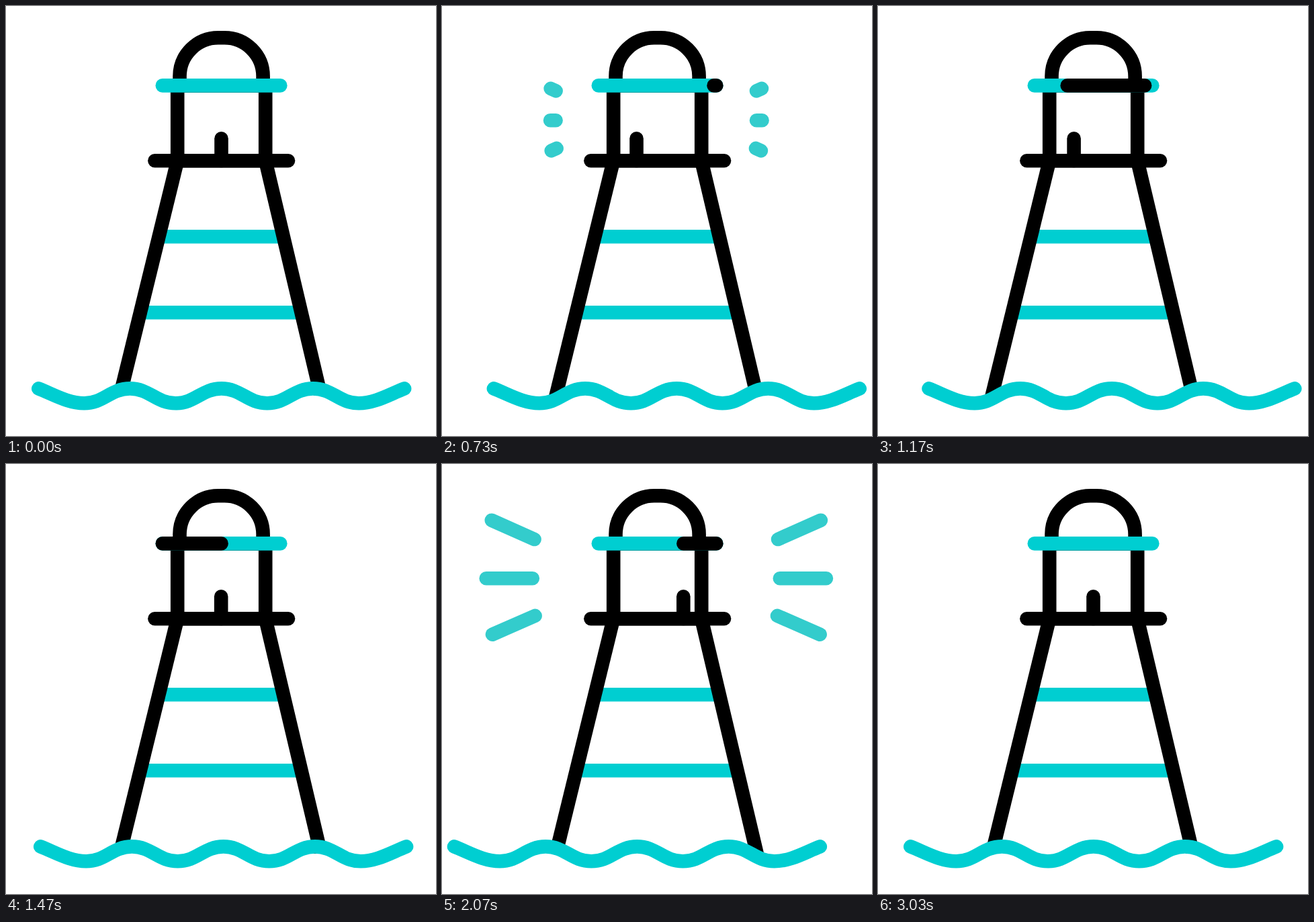
Write an HTML page that moves like this. It is 640x640 px and loops after 3170 ms.

```html
<!DOCTYPE html>
<html lang="en">
<head>
<meta charset="utf-8">
<title>Lighthouse</title>
<style>
  html, body { margin: 0; width: 100%; height: 100%; overflow: hidden; background: #fff; }
  svg { display: block; width: 100vw; height: 100vh; }
  .line { fill: none; stroke: #000; stroke-width: 20.6; }
  .round { stroke-linecap: round; }
  .teal { stroke: #00ced1; }
  .ray { stroke: #33cccc; }
</style>
</head>
<body>
<svg viewBox="0 0 640 640">
  <path class="line teal" d="M228 343.3H412M200 456.3H440"/>
  <path d="M244.7 230H265.8L180.1 580H159z"/>
  <path d="M375.5 230H396.6L479.3 580H458.2z"/>
  <path class="line" d="M258.5 118.4V104.7A57.4 57.4 0 0 1 315.9 47.3H325.2A57.4 57.4 0 0 1 382.6 104.7V118.4z"/>
  <path class="line" d="M255.2 118.4H386.2V230.2H255.2z"/>
  <path class="line round" d="M221.4 230.2H420"/>
  <path id="door" class="line round" d="M320.5 197.2V230"/>
  <path class="line round teal" d="M232.8 118.4H408.3"/>
  <path id="shade" class="line round"/>
  <path id="rays" class="line round ray"/>
  <path id="wave" class="line round teal" d="M48.3 569.4c23 9 44 21.9 68.1 21.9c29 0 39 -21.9 68.1 -21.9s39 21.9 68.1 21.9s39 -21.9 68.1 -21.9s39 21.9 68.1 21.9s39 -21.9 68.1 -21.9s39 21.9 68.1 21.9c24 0 45 -12.9 68.1 -21.9"/>
</svg>
<script>
const FPS = 30, LOOP = 3170, LAST = 91;
const $ = id => document.getElementById(id);

// Eased progress from frame a to frame b
function ease(n, a, b) {
  const p = Math.min(1, Math.max(0, (n - a) / (b - a)));
  return p * p * (3 - 2 * p);
}

// Swing from rest to peak, to the opposite peak and back
const swing = (n, peak, low) =>
  peak * ease(n, 0, 29) + (low - peak) * ease(n, 29, 60) - low * ease(n, 60, 90.3);

// The part of a straight line between two fractions of its length
function part([x, y, dx, dy], from, to) {
  if (to <= from) return "";
  const at = f => `${x + dx * f} ${y + dy * f}`;
  return `M${at(from)}L${at(to)}`;
}

const rail = [408.3, 118.4, -175.5, 0];
const rightRays = [[468, 126.3, 123.7, -55], [468, 170.2, 134.2, 0], [467, 211.9, 123.5, 54]];
const rays = rightRays.flatMap(([x, y, dx, dy]) => [[x, y, dx, dy], [637.6 - x, y, -dx, dy]]);

function draw(time) {
  const n = Math.min(LAST, Math.floor((time % LOOP + 4) * FPS / 1000));
  $("wave").setAttribute("transform", `translate(${swing(n, 33.5, -30.7)})`);
  $("door").setAttribute("transform", `translate(${swing(n, -36.3, 39.3)})`);

  $("shade").setAttribute("d", [0, 34].map(s =>
    part(rail, ease(n, 31 + s, 57 + s), ease(n, 20 + s, 43 + s))).join(""));

  $("rays").setAttribute("d", [0, 33].flatMap(s => rays.map(r =>
    part(r, ease(n, 26 + s, 35 + s), ease(n, 20 + s, 33 + s)))).join(""));
}

function tick() {
  draw(performance.now() - start);
  requestAnimationFrame(tick);
}
const start = performance.now();
tick();
</script>
</body>
</html>
```
